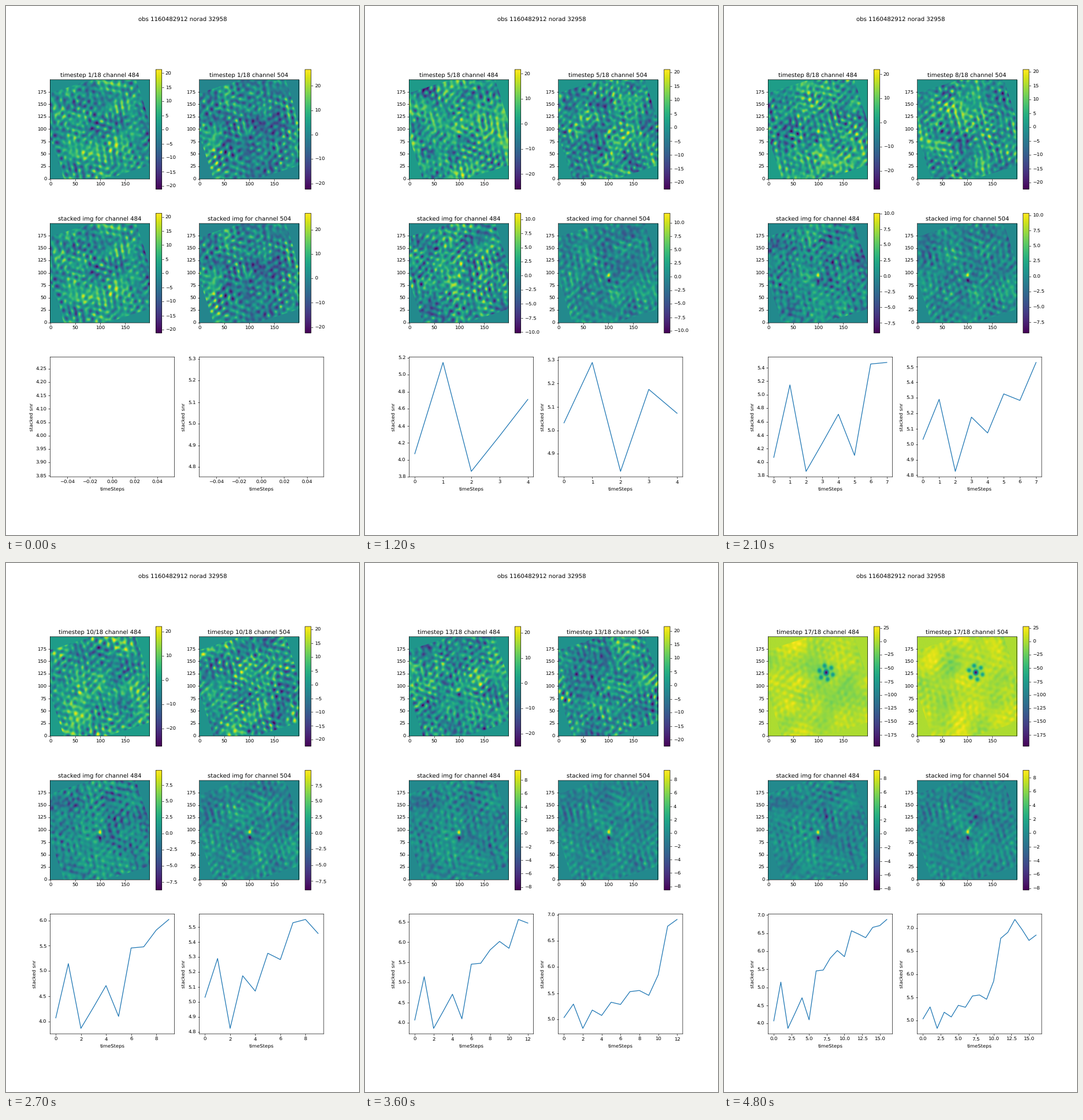
A matplotlib script that plays this animation: 611 px wide and 917 px high, repeating every 5100 ms.

```python
import numpy as np
import matplotlib.pyplot as plt
from matplotlib.animation import FuncAnimation

# Soft, unsnapped lines and text keep sub-pixel positions at this low dpi
plt.rcParams.update({"path.snap": False, "text.hinting": "none"})

DPI = 61.1
STEPS, FRAMES, SIZE = 18, 17, 200
CHANNELS = (484, 504)
ANGLE = np.radians(17.8)

SNR = (
    (4.07, 5.145, 3.863, 4.28, 4.71, 4.10, 5.455, 5.478, 5.81, 6.02, 5.85,
     6.565, 6.475, 6.375, 6.66, 6.71, 6.88),
    (5.032, 5.29, 4.825, 5.175, 5.073, 5.325, 5.283, 5.528, 5.55, 5.457, 5.85,
     6.78, 6.91, 7.19, 6.975, 6.735, 6.85),
)

Y, X = np.mgrid[:SIZE, :SIZE].astype(float)
FY, FX = np.meshgrid(*[np.fft.fftfreq(SIZE)] * 2, indexing="ij")
K2 = FX ** 2 + FY ** 2


def rotated_field():
    """Mask of the observed square, turned inside the image."""
    mid = (SIZE - 1) / 2
    u = (X - mid) * np.cos(ANGLE) + (Y - mid) * np.sin(ANGLE)
    v = (Y - mid) * np.cos(ANGLE) - (X - mid) * np.sin(ANGLE)
    return np.clip(mid + 0.5 - np.maximum(abs(u), abs(v)), 0, 1)


def blob(x, y, sx, sy=None):
    return np.exp(-((X - x) / sx) ** 2 / 2 - ((Y - y) / (sy or sx)) ** 2 / 2)


def beam(x, y):
    """Point response: a core with a hexagon of sidelobes."""
    out = blob(x, y, 3.1, 3.7)
    for a in np.radians(43 + 60 * np.arange(6)):
        out += 0.42 * blob(x + 14 * np.cos(a), y + 14 * np.sin(a), 2.9, 3.2)
    return out


def noise(rng, response):
    spec = np.fft.fft2(rng.standard_normal((SIZE, SIZE))) * response
    out = np.fft.ifft2(spec).real
    return out / out.std()


FIELD = rotated_field()
BEAM = beam(116, 127)
FINE = abs(np.fft.fft2(BEAM)) * (0.12 + K2 / (K2 + 0.06 ** 2))
BROAD = np.exp(-2 * np.pi ** 2 * K2 * 14 ** 2)


def step_limits(ch, i):
    if i == FRAMES - 1:
        return -196, 28
    if ch == 0:
        return -21.2 - 6.5 * np.sin(np.pi * i / 15), 21.3 + 0.1 * i
    return -22.4, 19.2 + 7.5 * np.exp(-i / 2) + 0.2 * i


def stack_limits(ch, i):
    n = i + 1
    if ch == 0:
        return -7.4 - 13.8 / n, 8.5 + 12.8 / n
    return -7.4 - 15 / n, 8 + 18.7 / n


def fit(img, lo, hi):
    img = img * FIELD
    return np.where(img > 0, img * hi / img.max(), img * lo / img.min())


def build(ch):
    """Single-step and running-mean images of one channel."""
    rng = np.random.default_rng(CHANNELS[ch])
    singles, stacks, total = [], [], 0
    for i in range(FRAMES):
        fine, broad = noise(rng, FINE), noise(rng, BROAD)
        amp = (min(5 + 1.5 * i, 14), 12)[ch]
        src = blob(100, 95, 2.6, 3.8) - 0.8 * blob(100, 83, 2.6, 3.8)
        if ch == 1:
            src += 0.35 * (blob(106, 103, 3) + blob(112, 111, 3))
        img = 5 * fine + 2 * broad + amp * src
        total = total + img
        mean = total / (i + 1)
        if i == FRAMES - 1:
            img = 4 * fine + 6 * broad - 195 * BEAM
            mean = mean - 6 * BEAM
        stacks.append(fit(mean, *stack_limits(ch, i)))
        singles.append(fit(img, *step_limits(ch, i)))
    return singles, stacks


IMAGES = [build(ch) for ch in range(2)]

fig, axes = plt.subplots(3, 2, figsize=(611.01 / DPI, 917.01 / DPI), dpi=DPI)
fig.suptitle("obs 1160482912 norad 32958")

maps, lines = [], []
for ch, name in enumerate(CHANNELS):
    for row, limits in enumerate((step_limits, stack_limits)):
        ax = axes[row, ch]
        im = ax.imshow(IMAGES[ch][row][0], origin="lower", cmap="viridis")
        fig.colorbar(im, ax=ax)
        maps.append((im, ch, row, limits))
    axes[1, ch].set_title(f"stacked img for channel {name}")
    axes[2, ch].set(xlabel="timeSteps", ylabel="stacked snr")
    lines += axes[2, ch].plot([], [])


def update(i):
    for im, ch, row, limits in maps:
        im.set_data(IMAGES[ch][row][i])
        im.set_clim(*limits(ch, i))
    for ch, line in enumerate(lines):
        axes[0, ch].set_title(f"timestep {i + 1}/{STEPS} channel {CHANNELS[ch]}")
        line.set_data(range(i + 1), SNR[ch][:i + 1])
        line.axes.relim()
        line.axes.autoscale_view()
    return [m[0] for m in maps] + lines


anim = FuncAnimation(fig, update, frames=FRAMES, interval=300,
                     repeat=True, repeat_delay=0, blit=False)
plt.show()
```
